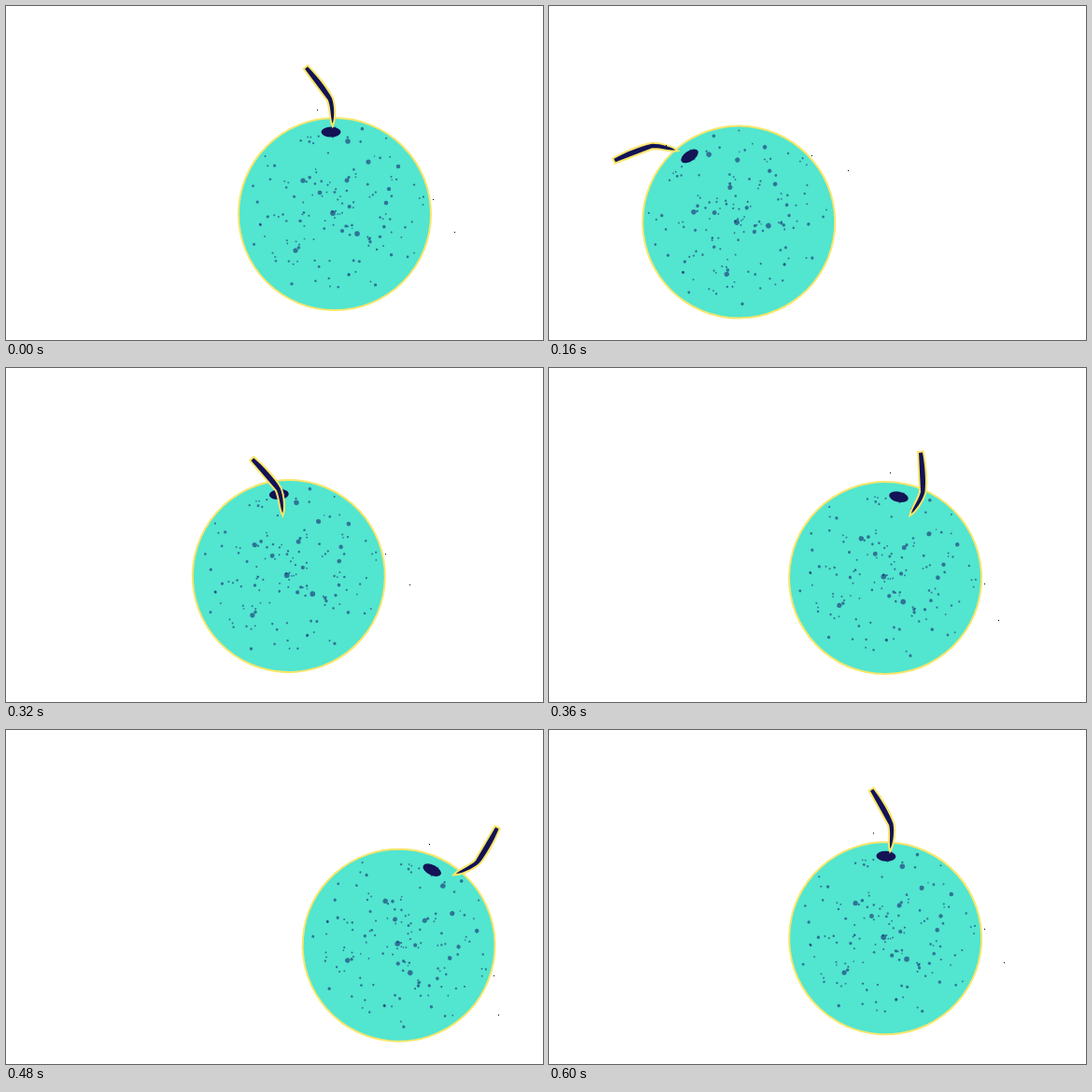
An HTML page with a canvas that plays this animation: 575 by 358 pixels, repeating every 0.64 s.

```html
<!DOCTYPE html>
<html lang="en">
<head>
<meta charset="utf-8">
<title>Swinging fruit</title>
<style>
html, body { margin: 0; width: 100%; height: 100%; overflow: hidden; background: #fff; }
canvas { display: block; }
</style>
</head>
<body>
<canvas id="stage" width="575" height="358"></canvas>
<script>
const ctx = document.getElementById('stage').getContext('2d');
const LOOP = 640, STEP = 40, RADIUS = 103;
const TEAL = '#52e5cf', YELLOW = '#fae66a', NAVY = '#131356', SPOT = '#16226e';
const rad = deg => deg * Math.PI / 180;

// The largest spots and the specks around the fruit, from its centre
const BIG_SPOTS = [[-2, -1], [24, 21], [14, -78], [-34, -36], [-42, 39], [36, -56],
  [13, -36], [-16, -23], [55, -12], [68, -51], [58, -27], [8, 18]];
const SPECKS = [[-19, -112], [105, -16], [128, 19]];

let seed = 11;
const random = () => (seed = (seed * 16807) % 2147483647) / 2147483647;

// Spots crowd towards the middle and thin out at the bottom.
const SPOTS = Array.from({ length: 140 }, () => {
  const angle = random() * Math.PI * 2, dist = 100 * Math.pow(random(), 0.75);
  const y = Math.sin(angle) * dist;
  return {
    x: Math.cos(angle) * dist,
    y: y > 0 ? y * 0.85 : y,
    r: 0.7 + 1.2 * random() * random() + 0.3 * random()
  };
});

// 0 at rest, 1 far left, 2 far right, 3 at rest again
function phase(t, right) {
  const turns = [0, 200, right, LOOP];
  const i = t < 200 ? 0 : t < right ? 1 : 2;
  const u = (t - turns[i]) / (turns[i + 1] - turns[i]);
  return i + u * u * (3 - 2 * u);
}

function blend(p, rest, left, right) {
  if (p < 1) return rest + (left - rest) * p;
  if (p < 2) return left + (right - left) * (p - 1);
  return right + (rest - right) * (p - 2);
}

function poseAt(t) {
  const move = phase(t, 445), turn = phase(t, 440);
  const reach = Math.min(move, 1, 3 - move);
  const angle = rad(blend(turn, 0, -38, 29.5));
  return {
    angle,
    x: blend(move, 352, 186, 427),
    // The fruit rocks over a pivot below its centre.
    y: 223 + 60 * (1 - Math.cos(angle + rad(3))),
    stemX: blend(move, 350, 115, 490),
    stemY: 130 + 29.5 * Math.pow(reach, 1.4),
    stemAngle: rad(blend(turn, 0, -83, 75))
  };
}

function place(x, y, angle, draw) {
  ctx.save();
  ctx.translate(x, y);
  ctx.rotate(angle);
  draw();
  ctx.restore();
}

function dot(x, y, r) {
  ctx.beginPath();
  ctx.arc(x, y, r, 0, Math.PI * 2);
  ctx.fill();
}

function drawFruit() {
  ctx.fillStyle = TEAL;
  dot(0, 0, RADIUS);
  ctx.strokeStyle = YELLOW;
  ctx.lineWidth = 2;
  ctx.stroke();

  ctx.fillStyle = SPOT;
  ctx.globalAlpha = 0.58;
  BIG_SPOTS.forEach(([x, y], i) => dot(x, y, 2.9 - i * 0.07));
  for (const s of SPOTS) dot(s.x, s.y, s.r);
  ctx.globalAlpha = 1;

  ctx.fillStyle = NAVY;
  ctx.beginPath();
  ctx.ellipse(-4, -88, 10.5, 5.5, 0, 0, Math.PI * 2);
  ctx.fill();
}

function drawStem() {
  ctx.beginPath();
  ctx.moveTo(-30, -62.5);
  ctx.lineTo(-27, -65);
  ctx.bezierCurveTo(-17, -55, -6, -41, -1, -31);
  ctx.bezierCurveTo(2, -22, 1.6, -9, -0.3, -4);
  ctx.bezierCurveTo(-2.4, -9, -2, -21, -5, -29);
  ctx.closePath();
  ctx.strokeStyle = YELLOW;
  ctx.lineWidth = 4;
  ctx.miterLimit = 4;
  ctx.stroke();
  ctx.fillStyle = NAVY;
  ctx.fill();
}

function drawSpecks(p) {
  const c = Math.cos(p.angle), s = Math.sin(p.angle);
  ctx.fillStyle = '#000';
  for (const [x, y] of SPECKS)
    ctx.fillRect(Math.round(p.x + x * c - y * s), Math.round(p.y + x * s + y * c), 1, 1);
}

function render(now) {
  const p = poseAt(Math.floor((now % LOOP) / STEP) * STEP);
  ctx.fillStyle = '#fff';
  ctx.fillRect(0, 0, 575, 358);
  place(p.x, p.y, p.angle, drawFruit);
  place(p.stemX, p.stemY, p.stemAngle, drawStem);
  drawSpecks(p);
}

const began = performance.now();
function tick() {
  render(performance.now() - began);
  requestAnimationFrame(tick);
}
tick();
</script>
</body>
</html>
```
